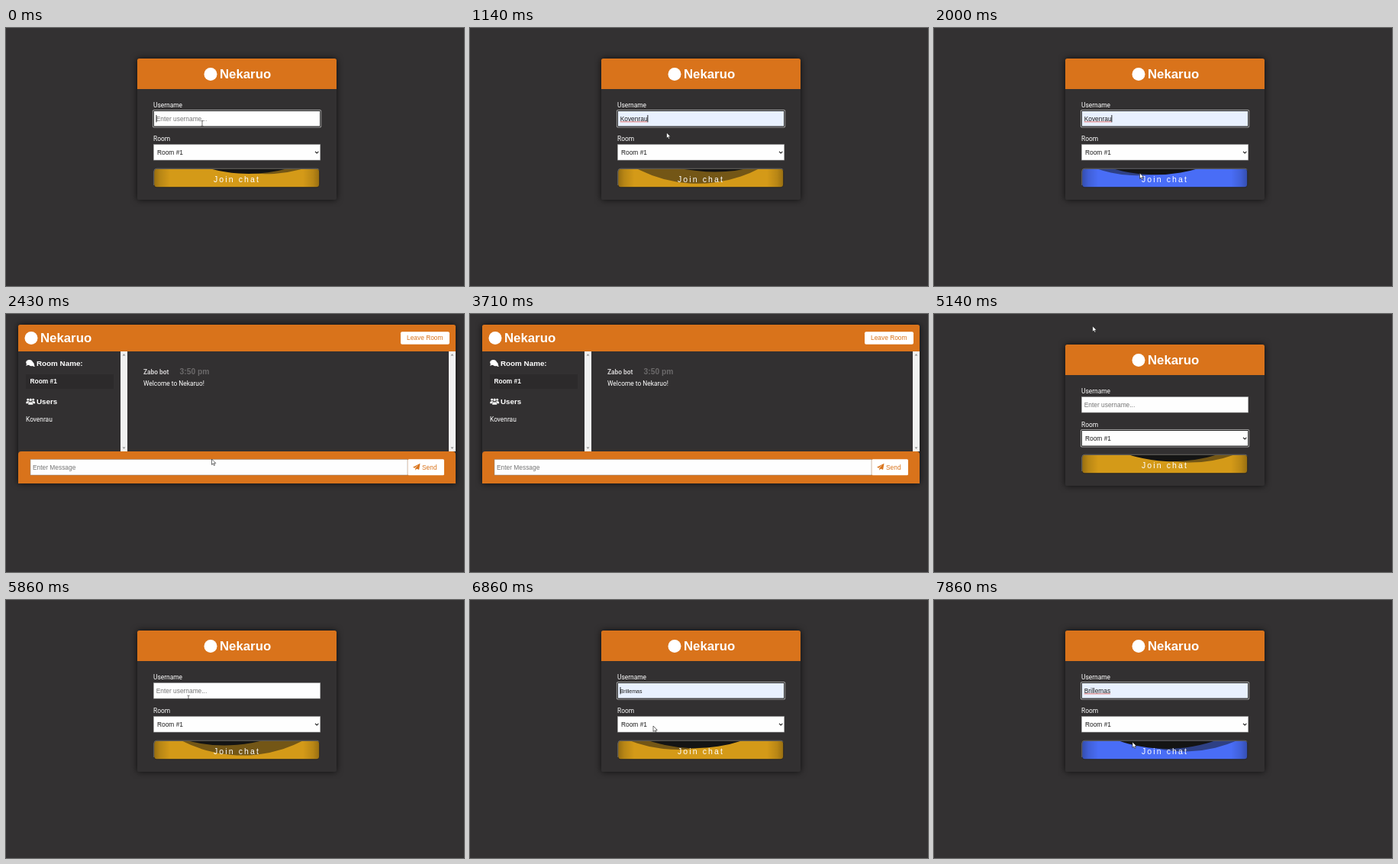
An HTML page for the animation above (8 s loop, 600 by 338 pixels).

```html
<!DOCTYPE html>
<html lang="en">
<head>
<meta charset="utf-8">
<title>Chat login</title>
<style>
  html, body { margin: 0; height: 100%; overflow: hidden; background: #333132; }
  svg { display: block; width: 100vw; height: 100vh; }
  text { font: 8.4px "Liberation Sans", Arial, sans-serif; fill: #fff; }
  .body { font-family: Roboto, sans-serif; }
  .bold { font-weight: bold; }
  .title { font-size: 16.8px; font-weight: bold; }
  .heading { font-size: 9.83px; font-weight: bold; }
  .time { font-size: 10.3px; font-weight: bold; fill: #6b696a; }
  .join { font-size: 10.5px; letter-spacing: 2.1px; }
  .dark { fill: #1c1c1c; }
  .hint { fill: #757575; }
  .accent, .bar { fill: #d9731b; }
  .panel { fill: #323031; filter: drop-shadow(0 0 4px rgba(0, 0, 0, .75)); }
  .field { fill: #fefefe; stroke: #858585; stroke-width: .5; }
  .ring { fill: none; stroke: #111; stroke-width: .9; }
  .halo { fill: none; stroke: #e8e8e8; stroke-width: .7; }
</style>
</head>
<body>
<svg viewBox="0 0 600 338" preserveAspectRatio="none">
  <defs>
    <clipPath id="buttonClip"><rect x="194" y="184.5" width="216.5" height="24" rx="3.5"/></clipPath>
    <linearGradient id="edgeShade">
      <stop offset="0" stop-opacity=".3"/>
      <stop offset=".04" stop-opacity=".13"/>
      <stop offset=".1" stop-opacity="0"/>
      <stop offset=".9" stop-opacity="0"/>
      <stop offset=".96" stop-opacity=".13"/>
      <stop offset="1" stop-opacity=".3"/>
    </linearGradient>
    <g id="scrollbar">
      <rect width="9" height="131" fill="#f1f1f1"/>
      <path d="M2.6 5.5l1.9-2.3 1.9 2.3zM2.6 125.5l1.9 2.3 1.9-2.3z" fill="#8a8a8a"/>
    </g>
    <g id="person"><circle cy="-2.3" r="1.9"/><path d="M-3.2 4.2v-1.6q0-2.2 2.2-2.2h2q2.2 0 2.2 2.2v1.6z"/></g>
  </defs>

  <g id="login">
    <rect class="panel" x="172" y="40" width="261" height="185" rx="2.6"/>
    <path class="bar" d="M172 80V42.6q0-2.6 2.6-2.6h255.8q2.6 0 2.6 2.6V80z"/>
    <circle cx="268" cy="60.5" r="8.5" fill="#fff"/>
    <text class="title" x="280" y="65.8">Nekaruo</text>

    <text class="body" x="193" y="104">Username</text>
    <rect class="field" id="nameField" x="193.3" y="108.5" width="218.5" height="20.6"/>
    <g id="nameFocus">
      <rect class="halo" x="192.4" y="107.6" width="220.3" height="22.4" rx="1"/>
      <rect class="ring" x="193.3" y="108.5" width="218.5" height="20.6" rx=".8"/>
    </g>
    <text id="nameText" x="196.7" y="121.5"></text>
    <path id="spelling" fill="none" stroke="#e0453c" stroke-width=".7"/>
    <path id="caret" stroke="#111" stroke-width=".9"/>

    <text class="body" x="193" y="148">Room</text>
    <rect class="field" x="193.3" y="152.5" width="218.5" height="20.6"/>
    <g id="roomFocus">
      <rect class="halo" x="192.4" y="151.6" width="220.3" height="22.4" rx="1"/>
      <rect class="ring" x="193.3" y="152.5" width="218.5" height="20.6" rx=".8"/>
    </g>
    <text class="dark" x="198" y="165.6">Room #1</text>
    <path d="M405 161.8l2.2 2.2 2.2-2.2" fill="none" stroke="#222" stroke-width="1.1"/>

    <g clip-path="url(#buttonClip)">
      <rect id="liquid" x="193.5" y="184" width="217.5" height="25"/>
      <rect x="193.5" y="184" width="217.5" height="25" fill="url(#edgeShade)"/>
      <rect id="wave" x="85.5" y="-248" width="434" height="434" rx="195.3" fill="#141414"/>
      <rect id="slowWave" x="85.5" y="-248" width="434" height="434" rx="173.6" fill="#141414" fill-opacity=".5"/>
    </g>
    <rect x="193.7" y="184.2" width="217" height="24.6" rx="3.8" fill="none" stroke="#232122" stroke-width=".8"/>
    <path d="M193.7 206v-18q0-3.8 3.8-3.8h209.4q2.4 0 3.4 1.6" fill="none" stroke="#777" stroke-width=".8"/>
    <text class="join" x="272" y="202">Join chat</text>
  </g>

  <g id="chat">
    <rect class="panel" x="16" y="14" width="573" height="208" rx="2.6"/>
    <path class="bar" d="M16 49V16.6q0-2.6 2.6-2.6h567.8q2.6 0 2.6 2.6V49z"/>
    <circle cx="33" cy="31.5" r="8.5" fill="#fff"/>
    <text class="title" x="45" y="37.3">Nekaruo</text>
    <rect x="517" y="23.2" width="64" height="16.6" rx="2" fill="#fff"/>
    <text class="accent" x="525" y="34.4">Leave Room</text>

    <g fill="#fff">
      <path d="M38 66.4q0 1.6 1 2.6-2 .1-3.2-.9-3 .8-4.8-1.3 4-.4 4.6-4.3 2.4 1.400 2.400 3.900z" transform="translate(-1)"/>
      <path d="M30.600 60c2.500 0 4.400 1.500 4.400 3.500S33.100 67 30.600 67q-.9 0-1.700-.3-1.200.9-2.900.9.900-.9 1-2-.8-.9-.8-2.100c0-2 1.900-3.500 4.400-3.500z"/>
      <use href="#person" transform="translate(28.700 114) scale(.75)"/>
      <use href="#person" transform="translate(35.700 114) scale(.75)"/>
      <use href="#person" transform="translate(32.200 114.800)" stroke="#323031" stroke-width=".5"/>
    </g>
    <text class="heading" x="40" y="68">Room Name:</text>
    <rect x="26" y="79" width="115" height="19" fill="#2c2a2b"/>
    <text class="bold" x="31.500" y="91">Room #1</text>
    <text class="heading" x="40" y="118">Users</text>
    <text class="body" x="26" y="141.200">Kovenrau</text>

    <use href="#scrollbar" x="150" y="49"/>
    <use href="#scrollbar" x="580" y="49"/>
    <text class="body bold" x="180" y="79.200" style="fill:#cfcdce">Zabo bot</text>
    <text class="time" x="227.500" y="79.200">3:50 pm</text>
    <text class="body" x="180" y="93.600">Welcome to Nekaruo!</text>

    <path class="bar" d="M16 222v-38q0-4 4-4h565q4 0 4 4v38z"/>
    <rect class="field" x="32" y="190.500" width="494" height="20.500"/>
    <text class="hint" x="35" y="203.500">Enter Message</text>
    <rect x="526.300" y="190.300" width="47.700" height="21" rx="1.500" fill="#fff"/>
    <path class="accent" d="M542.500 195.800l-1.400 8.200-3.100-1.300-1.700 2v-2.700l4.300-4.800-5.300 4.500-2.300-1z"/>
    <text class="accent" x="545" y="203.500">Send</text>
  </g>

  <g id="cursor">
    <path id="arrow" d="M0 0v7.400l1.700-1.500 1.200 2.600 1.300-.6-1.200-2.500h2.300z" fill="#fff" stroke="#111" stroke-width=".6"/>
    <path id="beam" d="M-1.500-3.500q1.500 0 1.500.7v5.600q0 .7-1.500.7M1.500-3.500q-1.500 0-1.500.7M0 2.800q0 .7 1.500.7" fill="none" stroke="#333" stroke-width=".7"/>
  </g>
</svg>

<script>
const LOOP = 8000, FPS = 7;
const CHAT_START = 2400, CHAT_END = 3950;
const GOLD = [212, 154, 24], BLUE = [73, 109, 246];

// Pointer stops: time, x, y
const STOPS = [
  [0, 257, 125], [430, 257, 125], [700, 257.5, 137], [1200, 257.5, 137],
  [1650, 269.5, 190], [3350, 269.5, 190], [3700, 60, -12], [5000, 200, -12],
  [5500, 239, 128.5], [6400, 239, 128.5], [6750, 240, 165], [7200, 240, 165],
  [7500, 260, 186], [LOOP, 260, 186]
];

// Each sign-in: field focused, name previewed, name chosen, button hovered, end
const SIGN_INS = [
  { name: "Kovenrau", focus: 0, preview: 560, choose: 990, hover: 1560, end: CHAT_START },
  { name: "Brillemas", focus: 6420, preview: 6700, choose: 7280, hover: 7400, end: LOOP }
];

const $ = id => document.getElementById(id);
const show = (id, on) => $(id).style.display = on ? "" : "none";
const mix = (a, b, k) => a + (b - a) * k;
const clamp = k => Math.min(1, Math.max(0, k));
const smooth = k => k * k * (3 - 2 * k);

function pointerAt(t) {
  const i = STOPS.findIndex(stop => stop[0] > t);
  const [t0, x0, y0] = STOPS[i - 1], [t1, x1, y1] = STOPS[i];
  const k = smooth((t - t0) / (t1 - t0));
  return [mix(x0, x1, k), mix(y0, y1, k)];
}

function drawName(t, entry) {
  const chosen = entry && t >= entry.choose;
  const filled = entry && t >= entry.preview;
  const text = $("nameText");
  text.textContent = filled ? entry.name : "Enter username...";
  text.setAttribute("class", filled ? "dark" : "hint");
  text.style.fontSize = filled && !chosen ? "7px" : "";
  $("nameField").style.fill = filled ? "#e8f0fe" : "";
  show("nameFocus", entry);
  show("spelling", chosen);

  const width = chosen ? text.getComputedTextLength() : 0;
  const start = chosen ? entry.choose : entry && entry.focus;
  $("spelling").setAttribute("d", `M196.7 122.9h${width}`);
  $("caret").setAttribute("d", `M${197 + width} 114v9.400`);
  show("caret", entry && (t - start) % 1000 < 500);
}

function drawButton(t, entry) {
  const turn = 7.5 + 36 * t / 1000;
  $("slowWave").setAttribute("transform", `rotate(${turn} 302.5 -31)`);
  $("wave").setAttribute("transform", `rotate(${2 * turn} 302.5 -31)`);
  const k = entry ? smooth(clamp((t - entry.hover) / 450)) : 0;
  $("liquid").style.fill = `rgb(${GOLD.map((c, i) => mix(c, BLUE[i], k))})`;
}

function draw(t) {
  const inChat = t >= CHAT_START && t < CHAT_END;
  const entry = SIGN_INS.find(s => t >= s.focus && t < s.end);
  show("chat", inChat);
  show("login", !inChat);
  show("roomFocus", t >= CHAT_END && t < 5250);
  drawName(t, entry);
  drawButton(t, entry);

  const [x, y] = pointerAt(t);
  const overField = !inChat && x > 193 && y > 108 && y < 129.5;
  $("cursor").setAttribute("transform", `translate(${x} ${y})`);
  show("beam", overField);
  show("arrow", !overField);
}

function tick() {
  const step = Math.floor((performance.now() % LOOP + 5) * FPS / 1000) % (LOOP * FPS / 1000);
  draw(step * 1000 / FPS);
  requestAnimationFrame(tick);
}
tick();
</script>
</body>
</html>
```
